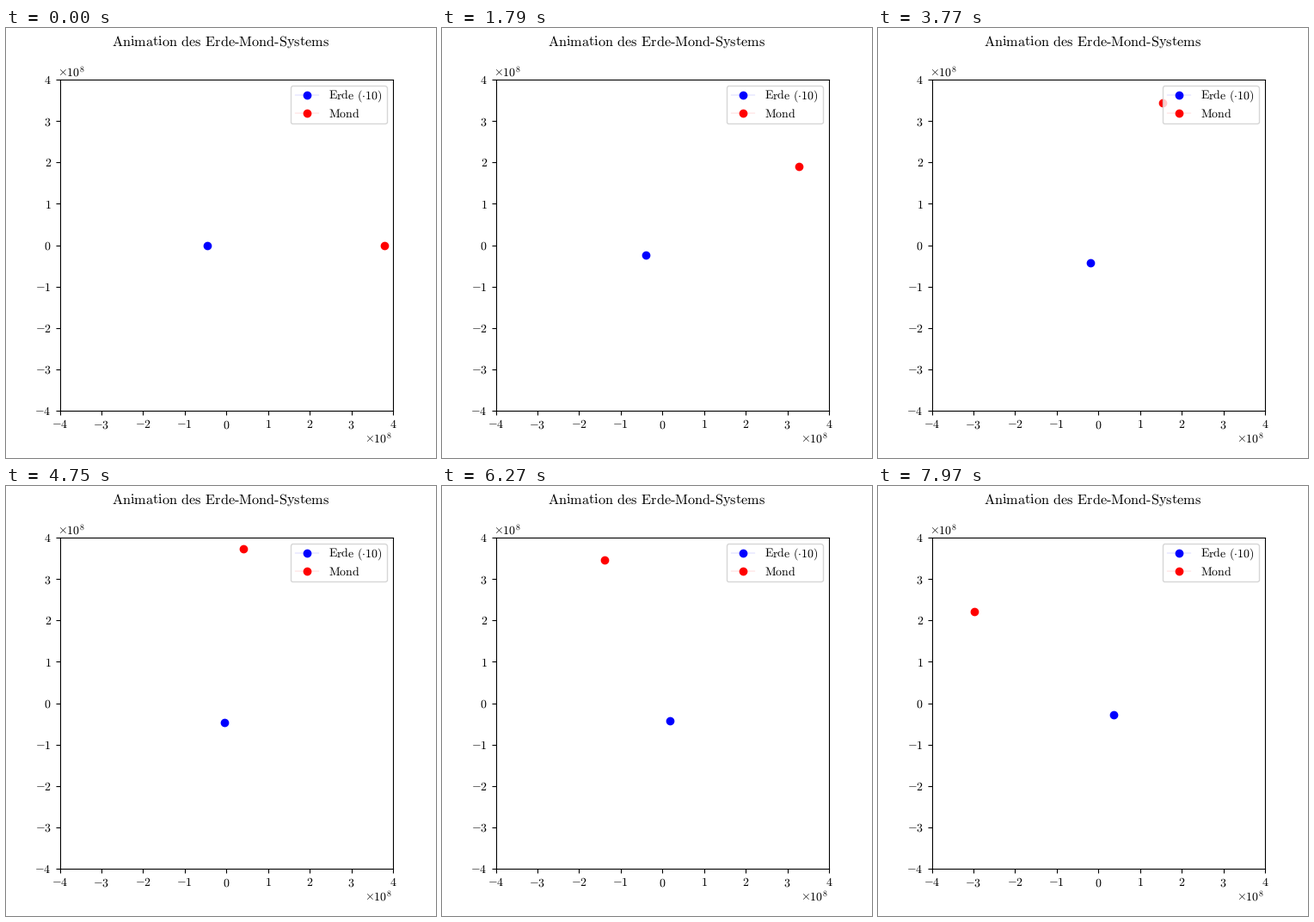
A matplotlib script that plays this animation: 500 by 500 pixels, repeating every 7990 ms.

```python
import numpy as np
import matplotlib.pyplot as plt
from matplotlib.animation import FuncAnimation
from matplotlib.lines import Line2D
from matplotlib.offsetbox import AnchoredOffsetbox, DrawingArea
from matplotlib.text import Text

plt.rcParams.update({
    "mathtext.fontset": "cm",
    "font.family": "Liberation Serif",   # line height close to Computer Modern
    "text.hinting": "none",
})

INTERVAL = 17       # ms
FRAMES = 470
APOGEE = 3.797e8    # moon to barycentre, m
EARTH = 4.67e7      # earth to barycentre, ten times enlarged
ECC = 0.0121
RATE = 0.00641      # mean anomaly per simulation step
# playback clock: time in ms against simulation step
TIMES = [0, 810, 1630, 2420, 3230, 7970]
STEPS = [0, 35, 76, 116, 156, 393]
UPPER_RIGHT, UPPER_LEFT = 1, 2

fig, ax = plt.subplots(figsize=(5, 5), dpi=100)
fig.text(249 / 500, 1 - 21 / 500, r"$\text{Animation des Erde-Mond-Systems}$",
         fontsize=11.7, ha="center", va="baseline")

ticks = np.arange(-4, 5)
labels = [f"${k}$" for k in ticks]
ax.set(xlim=(-4e8, 4e8), ylim=(-4e8, 4e8))
ax.set_xticks(ticks * 1e8, labels)
ax.set_yticks(ticks * 1e8, labels)

for x, y, align in ((60, 57, "left"), (449, 483, "right")):
    fig.text(x / 500, 1 - y / 500, r"$\times 10^8$", ha=align, va="baseline")

earth, = ax.plot([], [], "o", color="blue")
moon, = ax.plot([], [], "o", color="red")


def make_legend(rows):
    """Framed key, laid out in points."""
    area = DrawingArea(81, 32)
    for color, label, y in rows:
        area.add_artist(Line2D([4, 24], [y, y], color=color, lw=0.1))
        area.add_artist(Line2D([14], [y], color=color, marker="o"))
        area.add_artist(Text(32, y - 3.5, label, fontsize=10, va="baseline"))
    box = AnchoredOffsetbox(UPPER_RIGHT, child=area, pad=0, borderpad=0.5,
                            prop={"size": 10})
    box.patch.set(boxstyle="round,pad=0,rounding_size=0.2",
                  facecolor="white", edgecolor="0.8", alpha=0.8)
    return ax.add_artist(box)


legend = make_legend([
    ("blue", r"$\text{Erde (}{\cdot}10\text{)}$", 24),
    ("red", r"$\text{Mond}$", 9.2),
])


def orbit(step):
    """Angle from the apogee and distance relative to it."""
    m = RATE * step
    angle = m - 2 * ECC * np.sin(m) + 1.25 * ECC**2 * np.sin(2 * m)
    return angle, (1 - ECC) / (1 - ECC * np.cos(angle))


def update(i):
    t = (i + 1) * INTERVAL - 1
    angle, r = orbit(np.floor(np.interp(t, TIMES, STEPS) + 1e-9))
    pos = r * np.array([np.cos(angle), np.sin(angle)])
    mx, my = APOGEE * pos
    moon.set_data([mx], [my])
    earth.set_data([-EARTH * pos[0]], [-EARTH * pos[1]])
    # the legend dodges the moon
    covered = mx > 1.55e8 and my > 2.93e8
    legend.loc = UPPER_LEFT if covered else UPPER_RIGHT
    return earth, moon, legend


ani = FuncAnimation(fig, update, frames=FRAMES, interval=INTERVAL,
                    repeat=True, repeat_delay=0)
plt.show()
```
